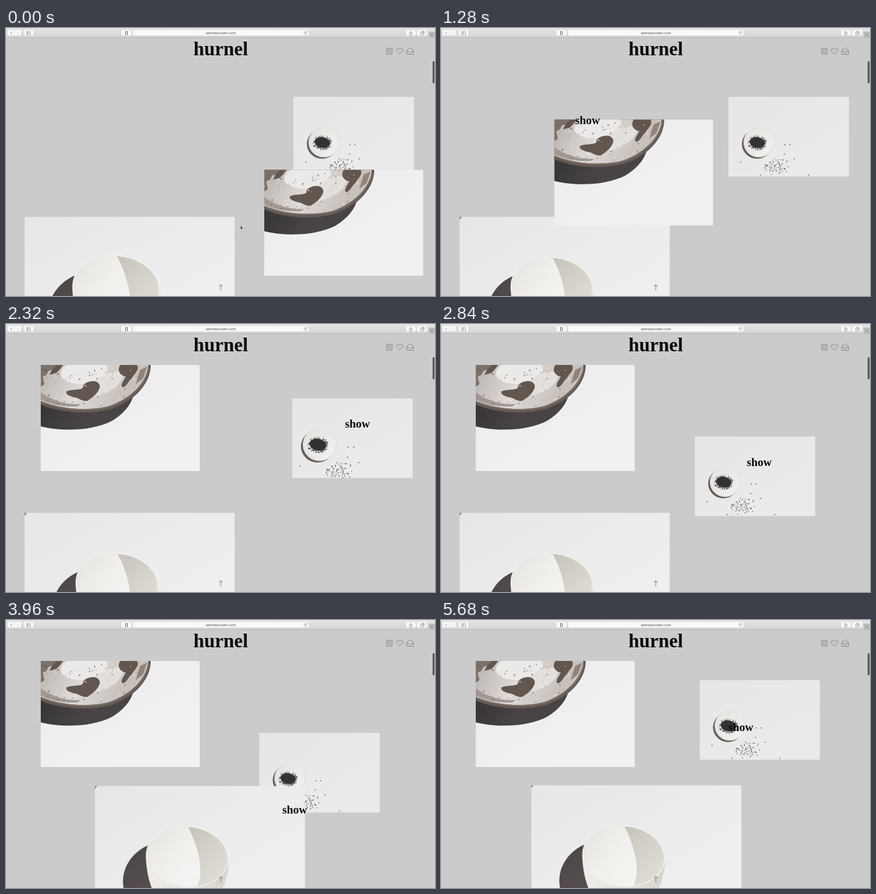
Animation, 691 px wide and 432 px high, one loop 5800 ms. Source, as an HTML page with a canvas:

```html
<!DOCTYPE html>
<html lang="de">
<head>
<meta charset="utf-8">
<title>hurnel</title>
<style>
html, body { margin: 0; width: 100%; height: 100%; overflow: hidden; background: #cbcbcb; }
canvas, svg { position: absolute; left: 0; top: 0; width: 691px; height: 432px; }
text { text-anchor: middle; fill: #0a0a0a; font-family: "Liberation Serif", serif; font-weight: 700; }
#brand { font-size: 31px; }
#show { font-size: 18.5px; }
#address { font: 400 5.8px "Liberation Sans", sans-serif; fill: #4a4a4a; }
</style>
</head>
<body>
<canvas id="stage"></canvas>
<svg viewBox="0 0 691 432">
  <text id="address" x="346" y="10.4">selmahurnelin.com</text>
  <text id="brand" x="346" y="43.5">hurnel</text>
  <text id="show">show</text>
  <path id="pointer" d="M0 0V5.2L1.2 4.1L2 6L2.9 5.6L2.1 3.8H3.7Z" fill="#111" stroke="#eee" stroke-width=".3"/>
</svg>
<script>
const LOOP = 5800;
const canvas = document.getElementById('stage');
const ctx = canvas.getContext('2d');
const show = document.getElementById('show');
const pointer = document.getElementById('pointer');
const ratio = window.devicePixelRatio || 1;
canvas.width = 691 * ratio;
canvas.height = 432 * ratio;

// Keys are [time, value, ...]; smooth and without overshoot.
function track(keys, t) {
  const last = keys.length - 1;
  if (t <= keys[0][0]) return keys[0].slice(1);
  if (t >= keys[last][0]) return keys[last].slice(1);
  let i = 0;
  while (t >= keys[i + 1][0]) i++;
  const a = keys[i], b = keys[i + 1], h = b[0] - a[0], u = (t - a[0]) / h;
  const slope = (j, n) => j < 0 || j >= last ? 0
    : (keys[j + 1][n] - keys[j][n]) / (keys[j + 1][0] - keys[j][0]);
  const tangent = (j, n) => {
    const p = slope(j - 1, n), q = slope(j, n);
    return p * q <= 0 ? 0 : 2 * p * q / (p + q);
  };
  return a.slice(1).map((v, k) => {
    const n = k + 1, w = 1 - u;
    return v * (1 + 2 * u) * w * w + tangent(i, n) * h * u * w * w
      + b[n] * u * u * (3 - 2 * u) - tangent(i + 1, n) * h * u * u * w;
  });
}

const cursorKeys = [
  [40, 378, 319], [480, 505, 283], [700, 518, 271], [940, 518, 271],
  [1040, 463, 272], [1200, 325, 212], [1340, 190, 117], [1480, 163, 109],
  [1600, 158, 108], [1840, 158, 108], [2060, 450, 130], [2240, 570, 151],
  [2320, 566, 161], [2400, 550, 182], [2700, 513, 223], [3040, 512, 224],
  [3280, 352, 345], [3430, 354, 345], [3520, 399, 344], [3700, 455, 318],
  [3900, 465, 306], [4300, 465, 306], [4480, 459, 235], [4600, 458, 218],
  [4680, 461, 180], [4800, 466, 133], [4920, 467, 132], [5200, 468, 152],
  [5440, 472, 167], [5680, 483, 173]
];

const plate = {
  w: 256, h: 171, shade: ['#ebebee', '#f1f1f4'], corner: 3, draw: drawPlate,
  pos: [[960, 416, 228.5], [1040, 408, 228.5], [1200, 274, 199], [1340, 125, 108],
        [1480, 61, 67], [1600, 56, 66]],
  zoom: [[200, 1], [480, 1.06], [700, 1.06], [980, 1]]
};
const dish = {
  w: 194, h: 128.5, shade: ['#e6e6e6', '#eaeaea'], corner: 0, draw: drawDish,
  pos: [[2240, 463, 111], [2320, 461, 120], [2400, 452, 128.5], [2550, 430, 156],
        [2750, 411, 179], [2920, 408, 182], [4620, 408, 182], [4680, 410, 165],
        [4760, 415, 118], [4840, 416.5, 98.5], [4960, 416.5, 97]],
  zoom: [[2080, 1], [2270, 1.1], [2380, 1.1], [2680, 1]]
};
const bowl = {
  w: 338.5, h: 225, shade: ['#e7e7e8', '#efeff0'], corner: 0, draw: drawBowl,
  pos: [[3430, 30, 304.3], [3520, 64.5, 304.8], [3600, 92, 298], [3750, 128, 278],
        [3950, 143, 267.5], [4120, 145.4, 266.3]],
  zoom: [[40, 1.06], [320, 1], [3100, 1], [3330, 1.1], [3540, 1.1], [3850, 1]]
};

function layers(t) {
  if (t < 2000) return [bowl, dish, plate];
  if (t < 3240) return [plate, bowl, dish];
  if (t < 4440) return [plate, dish, bowl];
  return [plate, bowl, dish];
}

function random(seed) {
  return () => {
    seed = (seed * 16807) % 2147483647;
    return seed / 2147483647;
  };
}

function shape(d, fill) {
  ctx.fillStyle = fill;
  ctx.fill(new Path2D(d));
}

function oval(x, y, rx, ry, fill, turn = 0) {
  ctx.beginPath();
  ctx.ellipse(x, y, rx, ry, turn, 0, Math.PI * 2);
  ctx.fillStyle = fill;
  ctx.fill();
}

function line(d, color = '#777', width = .8) {
  ctx.strokeStyle = color;
  ctx.lineWidth = width;
  ctx.stroke(new Path2D(d));
}

function fade(x0, y0, x1, y1, ...colors) {
  const g = ctx.createLinearGradient(x0, y0, x1, y1);
  colors.forEach((c, i) => g.addColorStop(i / (colors.length - 1), c));
  return g;
}

function box(x, y, w, h, r, fill) {
  ctx.beginPath();
  ctx.roundRect(x, y, w, h, r);
  ctx.fillStyle = fill;
  ctx.fill();
}

function drawPlate() {
  shape('M0 58V99C35 108 85 106 115 90C135 78 147 62 150 46Z', fade(0, 70, 60, 106, '#383536', '#484445'));
  shape('M0-12V64C30 77 75 81 110 72C145 62 174 35 177 5V-12Z', '#655a54');
  const inner = 'M0-12V58C30 71 75 75 108 67C141 57 170 31 173 3V-12Z';
  ctx.save();
  ctx.clip(new Path2D(inner));
  shape(inner, fade(0, 0, 130, 60, '#b9b2ad', '#dedad7', '#c7c0bb'));
  oval(70, 10, 38, 20, '#ebe9e7', -.15);
  oval(104, 30, 32, 14, '#e2dfdc', -.5);
  const brown = '#62574f';
  shape('M0-2L27-2L24 7L13 9L9 16L3 19L6 31L0 35Z', '#7d7069');
  shape('M26 0L36 0L30 8L25 13L14 16L18 8Z', brown);
  shape('M41 43C50 38 60 42 68 37C67 30 76 26 85 26C94 27 97 33 94 39C90 48 82 53 75 58C66 59 62 53 53 52C47 50 40 48 41 43Z', brown);
  shape('M128 0L155 0C160 8 150 14 147 21C141 25 139 35 132 36C127 33 134 25 137 19C126 16 123 8 128 0Z', brown);
  shape('M160 8L171 3L165 21L153 31Z', '#91847b');
  shape('M0 44C18 58 43 65 65 63L58 67C30 68 12 61 0 56Z', '#a29891');
  const rnd = random(71);
  for (let i = 0; i < 95; i++) {
    const x = rnd() * 165, y = 5 + rnd() * 62, r = .3 + rnd() * rnd() * 1.7;
    oval(x, y, r * 1.4, r, i % 4 ? 'rgba(90,77,69,.45)' : 'rgba(245,243,241,.6)', rnd() * 3);
  }
  ctx.restore();
  line('M0 59C30 72 75 76 109 68C143 58 171 32 174 4', '#9b9089', .7);
}

function drawDish() {
  oval(46, 76, 24.4, 23.8, '#665b56');
  oval(48.8, 73.5, 24.6, 24.1, '#deddd9');
  oval(49.2, 73.2, 23.4, 23, fade(28, 58, 70, 90, '#e5e4e0', '#f0f0ee'));
  oval(46.5, 73.6, 12.3, 8.8, '#303234', .18);
  const rnd = random(1234), ink = '#343638';
  for (let i = 0; i < 130; i++) {
    const a = rnd() * 6.283, d = .7 + rnd() * .4;
    oval(46.5 + Math.cos(a) * 14 * d, 73.8 + Math.sin(a) * 10.8 * d, .8, .5, ink, a);
  }
  for (let i = 0; i < 62; i++) {
    const x = 76 + (rnd() + rnd() - 1) * 23, y = 112 + (rnd() + rnd() - 1) * 15;
    oval(x, y, .85, .55, ink, rnd() * 3);
  }
  for (const [x, y] of [[20, 105], [91, 77], [99, 77], [90, 92], [106, 100], [129, 126], [52, 126]])
    oval(x, y, .9, .7, ink);
}

function drawBowl() {
  shape('M0 0H3.5L0 5Z', '#9b6d50');
  shape('M100 91C67 98 40 128 46 164C52 190 80 225 125 225L150 160Z', fade(50, 100, 110, 190, '#4d4646', '#5a5252'));
  shape('M82 112C83 150 95 205 147 210C192 208 215 160 216 118Z', fade(82, 0, 216, 0, '#eeedea', '#e5e3de', '#d6d3cb'));
  oval(149, 114, 67, 50, '#f0efec', .1);
  ctx.save();
  ctx.beginPath();
  ctx.ellipse(149, 114.5, 64.8, 48, .1, 0, Math.PI * 2);
  ctx.clip();
  ctx.fillStyle = fade(140, 75, 210, 145, '#c6c2b8', '#d4d1c8', '#dfddd6');
  ctx.fillRect(70, 50, 160, 130);
  shape('M141 50C159 80 171 112 170 143L163 175H60V50Z', fade(85, 80, 168, 140, '#e7e5e0', '#f0efec', '#f4f3f1'));
  const rnd = random(55);
  for (let i = 0; i < 35; i++)
    oval(155 + (rnd() - .5) * 28, 144 + (rnd() - .5) * 26, .7, .5, 'rgba(255,255,255,.6)');
  ctx.restore();
}

function drawImage(img, t) {
  const [x, y] = track(img.pos, t), [z] = track(img.zoom, t);
  ctx.save();
  ctx.translate(x, y);
  ctx.beginPath();
  ctx.roundRect(0, 0, img.w, img.h, [0, img.corner, 0, 0]);
  ctx.clip();
  ctx.fillStyle = fade(0, 0, img.w * .4, img.h, ...img.shade);
  ctx.fillRect(0, 0, img.w, img.h);
  ctx.translate(img.w / 2, img.h / 2);
  ctx.scale(z, z);
  ctx.translate(-img.w / 2, -img.h / 2);
  img.draw();
  ctx.restore();
}

function drawPageIcons() {
  line('M613 33H622V42H613Z');
  ctx.beginPath();
  ctx.arc(617.5, 37.5, 2.5, 0, Math.PI * 2);
  ctx.stroke();
  line('M634 42.3L629.2 37.4C626.5 34 631.5 30.8 634 34.8C636.5 30.8 641.5 34 638.8 37.4Z');
  line('M645.5 36L650.8 31.6L656.2 36V42.5H645.5ZM645.5 36L650.8 40L656.2 36');
  line('M346 423V413.4M342.8 416.8L346 413.3L349.2 416.8', '#666');
}

function drawBrowser() {
  ctx.fillStyle = fade(0, 0, 0, 16, '#e6e6e6', '#d3d3d3');
  ctx.fillRect(0, 0, 691, 16);
  ctx.fillStyle = '#b3b3b3';
  ctx.fillRect(0, 15.3, 691, .7);
  const buttons = [[3, 10.5], [14, 10.5], [29, 15], [186, 16], [204.5, 283], [644.5, 15.5], [662, 16]];
  for (const [x, w] of buttons) {
    box(x, 4, w, 9.2, 1.8, '#bdbdbd');
    box(x, 3.6, w, 9, 1.8, '#fafafa');
  }
  line('M9.2 6.2L7.4 8.2L9.2 10.2', '#555', .7);
  line('M18.4 6.2L20.2 8.2L18.4 10.2', '#aaa', .7);
  line('M33.5 6H39.5V10.4H33.5ZM35.6 6V10.4', '#666', .6);
  line('M192.5 5.8H195.5V10.6H192.5Z', '#444', .8);
  line('M484 6.9A2 2 0 1 0 484.2 8.8M484.3 5.6V7.2H482.7', '#666', .6);
  line('M651 7.5H650V11H654V7.5H653M652 9V5.2M650.9 6.2L652 5.1L653.1 6.2', '#666', .6);
  line('M668 7H672V11H668ZM669.4 7V5.6H673.4V9.6H672', '#666', .6);
  ctx.fillStyle = '#bbbbbb';
  ctx.fillRect(681, 6, 10, 10);
  line('M686 9.2V12.8M684.2 11H687.8', '#666', .6);
  box(687.2, 53.5, 3, 35.5, 1.5, '#555');
}

function render(t) {
  ctx.setTransform(ratio, 0, 0, ratio, 0, 0);
  ctx.fillStyle = '#cbcbcb';
  ctx.fillRect(0, 0, 691, 432);
  layers(t).forEach(img => drawImage(img, t));
  drawPageIcons();
  drawBrowser();

  const [x, y] = track(cursorKeys, t);
  const over = [plate, dish, bowl].some(img => {
    const [l, top] = track(img.pos, t);
    return x >= l && x <= l + img.w && y >= top && y <= top + img.h;
  });
  show.style.display = over ? '' : 'none';
  pointer.style.display = over ? 'none' : '';
  show.setAttribute('x', x);
  show.setAttribute('y', y + 5.5);
  pointer.setAttribute('transform', `translate(${x} ${y})`);
}

let start;
function tick(now) {
  start ??= now;
  render(Math.max(0, now - start) % LOOP);
  requestAnimationFrame(tick);
}
render(0);
requestAnimationFrame(tick);
</script>
</body>
</html>
```
